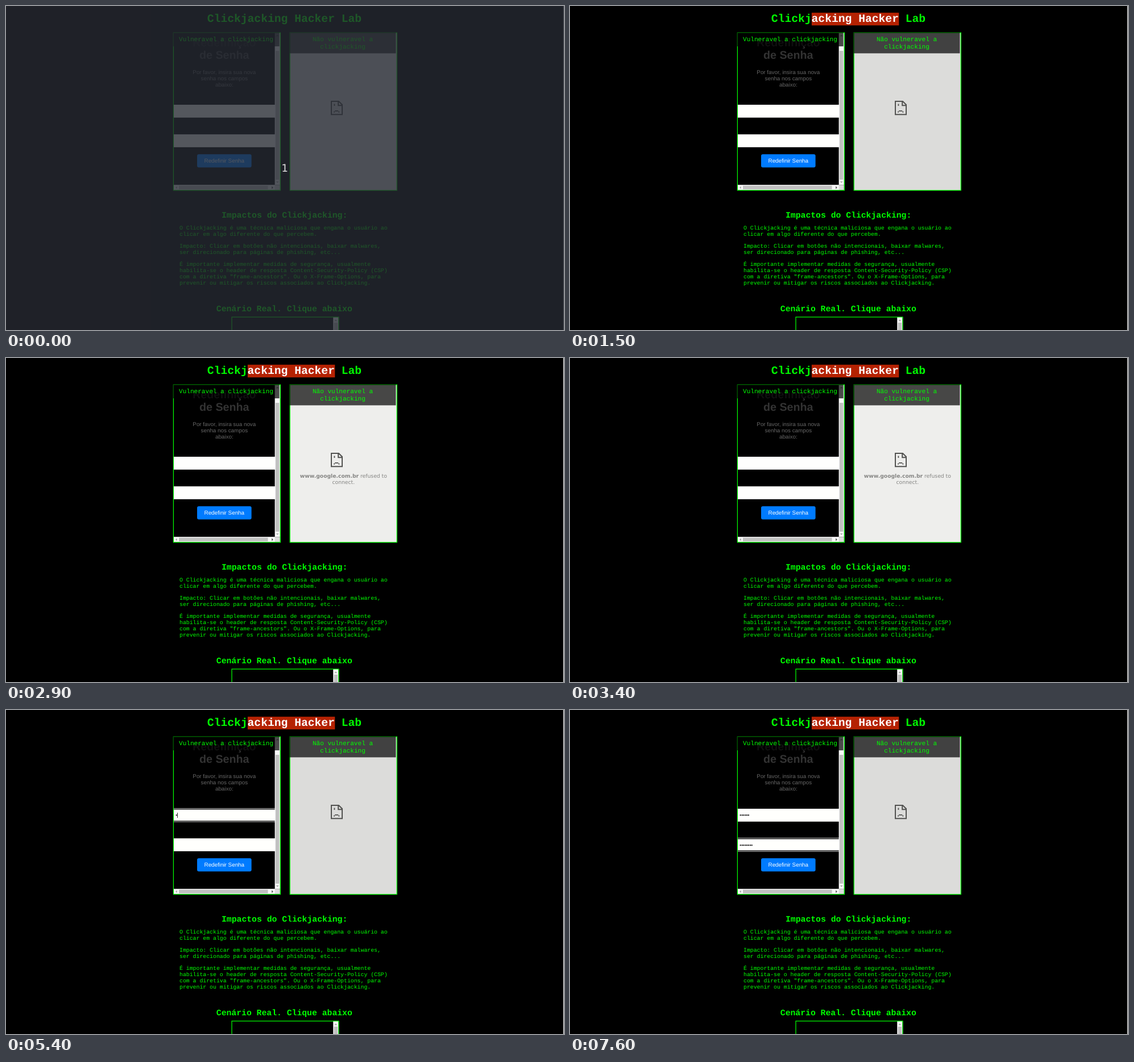
An HTML page for the animation above (8 s loop, 981x571 px).

```html
<!DOCTYPE html>
<html lang="pt-BR">
<head>
<meta charset="utf-8">
<title>Clickjacking Hacker Lab</title>
<style>
  html, body { margin: 0; width: 100%; height: 100%; overflow: hidden; background: #000; }
  svg { display: block; width: 981px; height: 571px; }
  text { white-space: pre; text-rendering: geometricPrecision; }
  .mono { font: 9.83px "Liberation Mono", monospace; fill: #0f0; }
  .h1 { font-size: 19.66px; font-weight: bold; }
  .h2 { font-size: 14.75px; font-weight: bold; }
  .label { font-size: 11.06px; }
  .sans { font: 9.83px "Liberation Sans", sans-serif; fill: #666; }
  .heading { font-size: 19.66px; font-weight: bold; fill: #333; }
  .bullets { font-size: 8.19px; fill: #000; }
  .dejavu { font: 9.22px "DejaVu Sans", sans-serif; fill: #868684; }
  .mid { text-anchor: middle; }
  .frame { fill: none; stroke: #0f0; stroke-width: 1.23px; }
  .track { fill: #f8f8f8; }
  .thumb { fill: #c1c1c1; }
  .off { fill: #a3a3a3; }
  .shade { fill: #000; fill-opacity: .7; }
  .field { fill: #fffffd; }
</style>
</head>
<body>
<svg viewBox="0 0 981 571">
  <rect width="981" height="571"/>
  <rect x="979.8" width="1.2" height="571" fill="#f1f1f1"/>

  <rect id="selection" x="424.9" y="11.8" width="153.4" height="22.4" fill="#b52202"/>
  <text class="mono h1" x="353.8" y="28.4">Clickj<tspan id="selected">acking Hacker</tspan> Lab</text>

  <!-- Vulnerable panel -->
  <g class="sans mid">
    <text class="heading" x="383.8" y="70.6">Redefinição</text>
    <text class="heading" x="383.8" y="93.4">de Senha</text>
    <text x="383.8" y="120">Por favor, insira sua nova</text>
    <text x="383.8" y="131">senha nos campos</text>
    <text x="383.8" y="142.1">abaixo:</text>
  </g>
  <g id="fields"></g>
  <rect x="336" y="261.3" width="95.6" height="23.2" rx="3" fill="#007bff"/>
  <text class="sans mid" x="383.8" y="276" style="fill:#fff">Redefinir Senha</text>

  <rect class="track" x="472.6" y="47" width="9.2" height="268"/>
  <rect class="thumb" x="473.9" y="79" width="6.4" height="227"/>
  <path class="off" d="M474.7 53.3h5l-2.5-2.5zM474.7 309.2h5l-2.5 2.5z"/>
  <rect class="track" x="295" y="315.2" width="178" height="9.2"/>
  <rect class="thumb" x="304" y="316.7" width="156.5" height="6.4"/>
  <path class="off" d="M300.7 317.4v5l-2.6-2.5z"/>
  <path d="M467.2 317.4v5l2.6-2.5z" fill="#505050"/>
  <rect x="472.6" y="315.2" width="9.2" height="9.2" fill="#dcdcdc"/>
  <rect class="frame" x="294.4" y="47.1" width="188" height="277.8"/>
  <rect class="shade" x="293.8" y="46.5" width="186.8" height="24.6"/>
  <text class="mono label" x="304.1" y="62.1">Vulneravel a clickjacking</text>

  <!-- Protected panel -->
  <rect id="errorPage" x="499.2" y="47" width="188" height="278"/>
  <g fill="none" stroke="#525250" stroke-width="2">
    <path d="M572 168H585L591 174V191.2H572ZM584.2 168V175.2H591"/>
    <path d="M577.4 172.6v3.4M576 186.6h2.2M578.2 184.8h6M584.2 186.6h2.2" stroke-width="1.8"/>
  </g>
  <g id="refusal" class="dejavu mid">
    <text x="593.3" y="211"><tspan font-weight="bold">www.google.com.br</tspan> refused to</text>
    <text x="593.3" y="221.8">connect.</text>
  </g>
  <rect class="frame" x="499.2" y="47.1" width="188" height="277.8"/>
  <rect class="shade" x="498.6" y="46.5" width="186.8" height="36.9"/>
  <g class="mono mid">
    <text class="label" x="592" y="62.1">Não vulneravel a</text>
    <text class="label" x="592" y="74.5">clickjacking</text>
  </g>

  <!-- Explanation -->
  <text class="mono h2" x="379" y="372.6">Impactos do Clickjacking:</text>
  <g id="article" class="mono"></g>
  <text class="mono h2" x="369.8" y="537.9">Cenário Real. Clique abaixo</text>
  <rect class="track" x="575.2" y="548" width="9.2" height="23"/>
  <rect class="thumb" x="576.6" y="558" width="6.4" height="13"/>
  <path class="off" d="M577.3 555.2h5l-2.5-2.7z"/>
  <rect class="frame" x="397" y="548.2" width="188" height="40"/>

  <g id="countdown">
    <rect width="981" height="571" fill="#272a33" fill-opacity=".79"/>
    <text class="dejavu mid" x="490.2" y="292.2" style="font-size:18.4px;fill:#dcdcdc">1</text>
  </g>
</svg>
<script>
const LOOP = 8000, STEP = 100;
const FIELD_TOPS = [174, 226.2];
const BULLET_X = 298.3, BULLET_WIDTH = 2.87;
const $ = id => document.getElementById(id);
const clamp = (v, max) => Math.max(0, Math.min(max, v));
const between = (t, from, to) => t >= from && t < to;
const show = (node, on) => node.setAttribute('visibility', on ? 'visible' : 'hidden');

const paragraphs = [
  ['O Clickjacking é uma técnica maliciosa que engana o usuário ao',
   'clicar em algo diferente do que percebem.'],
  ['Impacto: Clicar em botões não intencionais, baixar malwares,',
   'ser direcionado para páginas de phishing, etc...'],
  ['É importante implementar medidas de segurança, usualmente',
   'habilita-se o header de resposta Content-Security-Policy (CSP)',
   'com a diretiva "frame-ancestors". Ou o X-Frame-Options, para',
   'prevenir ou mitigar os riscos associados ao Clickjacking.']
];
let baseline = 394.2;
for (const lines of paragraphs) {
  for (const line of lines) {
    $('article').innerHTML += `<text x="305" y="${baseline}">${line}</text>`;
    baseline += 11.06;
  }
  baseline += 9.83;
}

$('fields').innerHTML = FIELD_TOPS.map(y => `<g>
  <rect class="field" x="295" y="${y}" width="178" height="22.7"/>
  <g class="ring">
    <rect x="295" y="${y - 0.9}" width="178" height="24.3" fill="#ddd"/>
    <rect x="295" y="${y - 0.1}" width="178" height="22.6" fill="#101010"/>
    <rect class="field" x="295" y="${y + 1.4}" width="178" height="19.7"/>
  </g>
  <text class="sans bullets" x="${BULLET_X}" y="${y + 14.3}"></text>
  <rect class="caret" y="${y + 7}" width=".8" height="9"/>
</g>`).join('');
const fields = [...$('fields').children];

function drawField(field, count, focused, caretOn) {
  const caret = field.querySelector('.caret');
  field.querySelector('.bullets').textContent = '•'.repeat(count);
  caret.setAttribute('x', BULLET_X + BULLET_WIDTH * count);
  show(field.querySelector('.ring'), focused);
  show(caret, caretOn);
}

function ease(t, start) {
  const p = clamp((t - start) / 200, 1);
  return p * p * (3 - 2 * p);
}

function draw(t) {
  show($('countdown'), t < 100);
  show($('selection'), t >= 1500);
  $('selected').setAttribute('fill', t >= 1500 ? '#fff' : '#0f0');

  const hover = ease(t, 1750) - ease(t, 4350);
  const grey = Math.round(220 + 18 * hover);
  $('errorPage').setAttribute('fill', `rgb(${grey},${grey},${grey - 2})`);
  $('refusal').setAttribute('opacity', hover);

  const first = between(t, 4900, 6400);
  drawField(fields[0], clamp((t - 5300) / STEP, 6), first, first);
  drawField(fields[1], clamp((t - 6300) / STEP, 8), t >= 6400, between(t, 6400, 7600));
}

const origin = performance.now();
function tick() {
  const t = (performance.now() - origin) % LOOP;
  draw(Math.floor(t / STEP) * STEP);
  requestAnimationFrame(tick);
}
tick();
</script>
</body>
</html>
```
